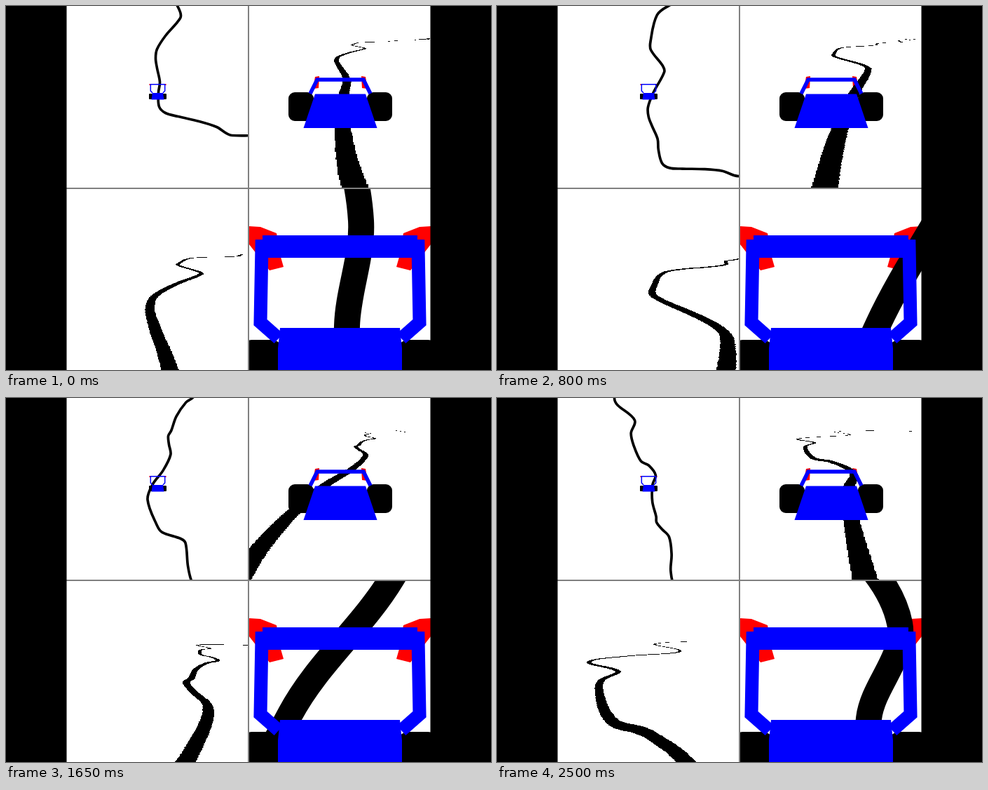
These frames come from a looping animation (692 px wide and 519 px high, 2.55 s). An HTML page with a canvas:

```html
<!DOCTYPE html>
<html>
<head>
<meta charset="utf-8">
<style>
html, body { margin: 0; width: 692px; height: 519px; overflow: hidden; background: #000; }
canvas { display: block; }
</style>
</head>
<body>
<canvas id="stage" width="692" height="519"></canvas>
<script>
const W = 692, H = 519, SIZE = 260, LOOP = 2550, STEP = 50;
const ctx = document.getElementById('stage').getContext('2d');
const RED = '#f00', BLUE = '#00f', BLACK = '#000', WHITE = '#fff', GREY = '#808080';
const clamp = v => Math.max(0, Math.min(1, v));

// The car speeds up on a straight line, then follows a circle at constant speed
const START = 500, SPEED = .15, TURN = .04 * Math.PI / 180, RADIUS = SPEED / TURN;

function poseAt(t) {
  const angle = Math.max(0, t - START) * TURN;
  const behind = t < START ? SPEED / 2 * (START - t * t / START) : 0;
  return { x: RADIUS * (1 - Math.cos(angle)), y: behind - RADIUS * Math.sin(angle), angle };
}

// The nose lifts while the car speeds up
const pitchAt = t => clamp(t / 200) * clamp((START + 200 - t) / 200);

// Bends of the closed track on the ground
const bends = [
  [106,100],[84,88],[59,80],[29,73],[11,68],[2,59],[1,39],[3,24],[-1,4],[-3,-10],[-1,-23],
  [11,-42],[32,-67],[32,-76],[20,-102],[22,-114],[39,-149],[60,-159],[84,-162],[108,-170],
  [117,-182],[125,-191],[133,-193],[153,-202],[177,-206],[191,-204],[203,-216],[207,-228],
  [227,-242],[244,-249],[263,-247],[289,-281],[318,-258],[361,-206],[442,-246],[502,-175],
  [514,-104],[480,0],[300,70],[180,95]
];
const bend = i => bends[(i + bends.length) % bends.length];
const tangent = i => {
  const [ax, ay] = bend(i - 1), [bx, by] = bend(i + 1), d = Math.hypot(bx - ax, by - ay);
  return [(bx - ax) / d, (by - ay) / d];
};
const track = new Path2D();
track.moveTo(...bend(0));
bends.forEach(([x, y], i) => {
  const [nx, ny] = bend(i + 1), [ux, uy] = tangent(i), [vx, vy] = tangent(i + 1);
  const h = Math.hypot(nx - x, ny - y) / 3;
  track.bezierCurveTo(x + ux * h, y + uy * h, nx - vx * h, ny - vy * h, nx, ny);
});

function strokeTrack(g) {
  g.lineWidth = 3.7;
  g.lineJoin = 'round';
  g.strokeStyle = BLACK;
  g.stroke(track);
}

function makeCanvas(width, height) {
  const canvas = document.createElement('canvas');
  canvas.width = width;
  canvas.height = height;
  return canvas.getContext('2d', { willReadFrequently: true });
}

// Ground map sampled by the perspective views
const map = { x: -20, y: -310, w: 2850, h: 2200, scale: 5 };
const ground = (() => {
  const g = makeCanvas(map.w, map.h);
  g.scale(map.scale, map.scale);
  g.translate(-map.x, -map.y);
  strokeTrack(g);
  const rgba = g.getImageData(0, 0, map.w, map.h).data;
  return Uint8Array.from({ length: map.w * map.h }, (_, i) => rgba[i * 4 + 3] > 127);
})();

const layer = makeCanvas(SIZE, SIZE);
const image = layer.createImageData(SIZE, SIZE);

// Seen from above
const overhead = (y, scale) => (view, pose) => {
  ctx.save();
  ctx.translate(view.axis, y);
  ctx.scale(scale, scale);
  ctx.rotate(-pose.angle);
  ctx.translate(-pose.x, -pose.y);
  strokeTrack(ctx);
  ctx.restore();
};

// Seen along the ground: depth = near + slope * distance ahead of the car
const perspective = (horizon, zoom, near, slope) => (view, pose) => {
  const c = Math.cos(pose.angle), s = Math.sin(pose.angle);
  image.data.fill(0);
  for (let y = 0; y < SIZE; y++) {
    const depth = zoom / (view.top + y + .5 - horizon), ahead = (depth - near) / slope;
    if (depth <= 0) continue;
    for (let x = 0; x < SIZE; x++) {
      const side = (view.left + x + .5 - view.axis) * depth;
      const mx = Math.floor((pose.x + side * c + ahead * s - map.x) * map.scale);
      const my = Math.floor((pose.y + side * s - ahead * c - map.y) * map.scale);
      const inside = mx >= 0 && my >= 0 && mx < map.w && my < map.h;
      if (inside && ground[my * map.w + mx]) image.data[(y * SIZE + x) * 4 + 3] = 255;
    }
  }
  layer.putImageData(image, 0, 0);
  ctx.drawImage(layer.canvas, view.left, view.top);
};

// Car parts give the left half; tilt(y, pitch) returns [x scale, new y]
const views = [
  {
    left: 86, top: 0, axis: 216.5, drawTrack: overhead(122, 1),
    tilt: (y, p) => [1, y + p * (y - 122) / 10],
    red: [[204.5,111],[207,111],[207,113],[204.5,113]],
    wheel: [204, 125, 5, 8, 1],
    bar: { points: [[209,124],[206.3,121],[206.3,111.7]], width: 1.5 },
    hood: [[209,124],[207.5,133.5]]
  },
  {
    left: 346, top: 0, axis: 477, drawTrack: perspective(37, 22, .24, .0065),
    tilt: (y, p) => [1 - p * (y - 150) / 1000, y + p * (y - 150) / 8],
    red: [[441,101],[447,100],[446,117],[438,118]],
    wheel: [403, 123, 36, 41, 9],
    bar: { points: [[434,125],[444,105]], width: 5.5 },
    hood: [[441,125.5],[424.5,174]]
  },
  { left: 86, top: 260, axis: 216, drawTrack: perspective(326, 29, .083, .00414) },
  {
    left: 346, top: 260, axis: 476.5, drawTrack: overhead(441, 10),
    tilt: (y, p) => {
      const lift = clamp((460 - y) / 133) ** 2;
      return [1 + p * (.05 + .28 * lift), y + p * (5 - 23 * lift)];
    },
    red: [[347,314],[363,315],[386,324],[392,358],[396,372],[376,377],[347,340]],
    wheel: [335, 476, 60, 60, 16],
    bar: { points: [[389,474],[363,451],[365,343]], width: 19 },
    beam: [[366,327],[366,333],[356,333],[356,359]],
    hood: [[391,459],[388,488],[388,530]]
  }
];

function drawView(view, pose, pitch) {
  const { axis, tilt, wheel, bar } = view;
  const place = (points, side) => points.map(([x, y]) => {
    const [scale, ny] = tilt(y, pitch);
    return [axis + side * (x - axis) * scale, ny];
  });
  const outline = points => {
    ctx.beginPath();
    points.forEach(p => ctx.lineTo(...p));
  };
  const symmetric = points => outline([...place(points, 1), ...place(points, -1).reverse()]);

  ctx.save();
  ctx.beginPath();
  ctx.rect(view.left, view.top, SIZE, SIZE);
  ctx.clip();
  if (view.red) {
    ctx.fillStyle = RED;
    for (const side of [1, -1]) {
      outline(place(view.red, side));
      ctx.fill();
    }
  }
  view.drawTrack(view, pose);
  if (wheel) {
    const [x, y, w, h, r] = wheel;
    ctx.fillStyle = BLACK;
    ctx.beginPath();
    ctx.roundRect(x, y, w, h, r);
    ctx.roundRect(2 * axis - x - w, y, w, h, r);
    ctx.fill();
    ctx.fillStyle = ctx.strokeStyle = BLUE;
    ctx.lineWidth = bar.width;
    ctx.lineJoin = 'miter';
    symmetric(bar.points);
    ctx.stroke();
    for (const part of [view.beam, view.hood]) {
      if (!part) continue;
      symmetric(part);
      ctx.fill();
    }
  }
  ctx.restore();
}

function rect(color, ...box) {
  ctx.fillStyle = color;
  ctx.fillRect(...box);
}

function draw(t) {
  const pose = poseAt(t), pitch = pitchAt(t);
  rect(WHITE, 0, 0, W, H);
  for (const view of views) drawView(view, pose, pitch);
  rect(GREY, 345, 0, 2, H);
  rect(GREY, 86, 259, 520, 2);
  rect(BLACK, 0, 0, 86.5, H);
  rect(BLACK, 605.5, 0, 87, H);
}

let shown = -1;
const start = performance.now();
function tick() {
  const t = Math.floor((performance.now() - start) % LOOP / STEP) * STEP;
  if (t !== shown) draw(shown = t);
  requestAnimationFrame(tick);
}
tick();
</script>
</body>
</html>
```
